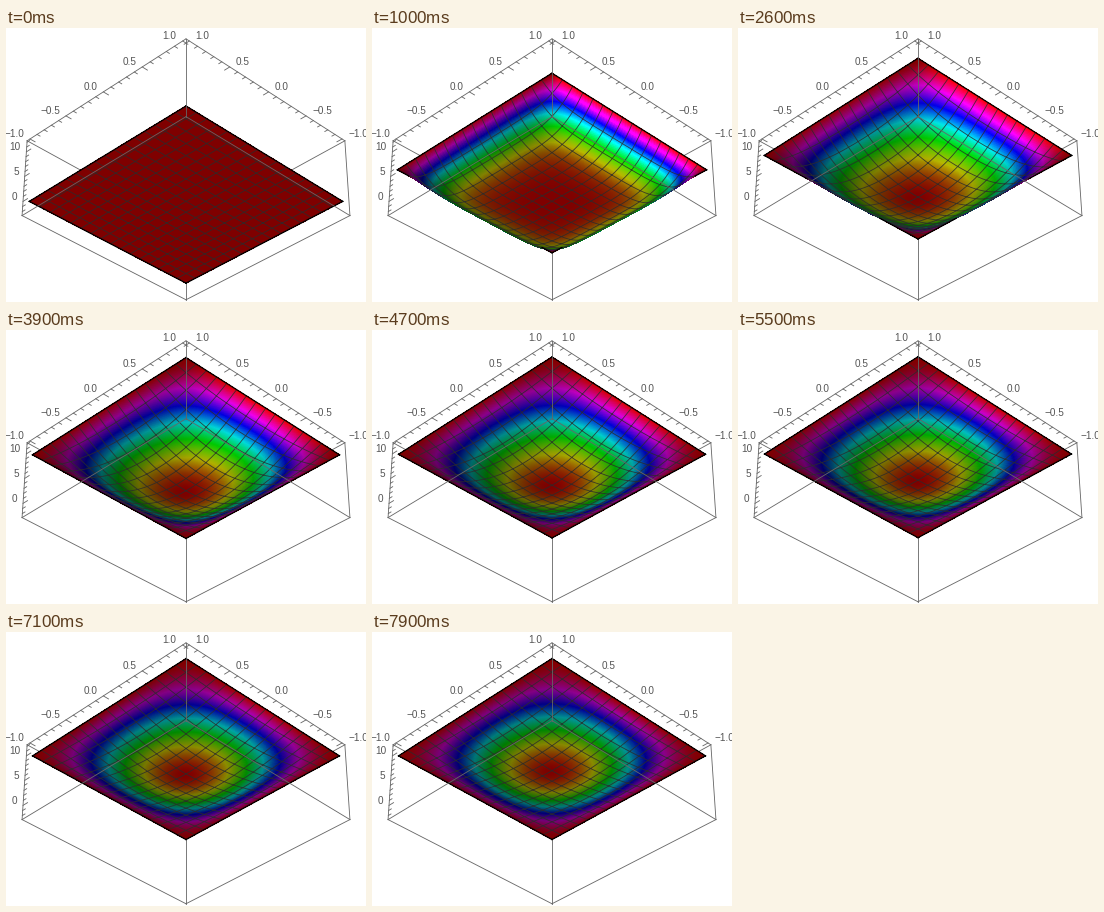
Recreate the animation shown at these times as a matplotlib script. Size 360 px wide and 274 px high, loop 8000 ms.

```python
import numpy as np
import matplotlib.pyplot as plt
from matplotlib.animation import FuncAnimation

W, H, DPI = 360, 274, 100
PX = 72 / DPI
FRAMES, STEP = 80, 100

# Camera below the box, looking up at its near vertical edge
DIST, SCALE = 14.6, 114.1
S, C = 0.5735, 0.8192
CX, CY = 180, 149.6
R2 = np.sqrt(2)

# Box of 2 x 2 x 0.8 around the padded plot range
PAD = 1.04
Z_LO, Z_HI = -2.79, 12.29
Z_UNIT = 0.8 / (Z_HI - Z_LO)

# Heat flow on [-1, 1]^2 whose rim warms as 10 (1 - exp(-t))
ALPHA = 0.05
CELLS, SUB = 16, 30
N = CELLS * SUB + 1
axis = np.linspace(-1, 1, N)
modes = np.arange(1, 80, 2)
freq = modes * np.pi / 2
coef = 4 / np.pi * (-1.0) ** ((modes - 1) // 2) / modes
basis = np.cos(np.outer(axis, freq)) * coef
slope = -np.sin(np.outer(axis, freq)) * coef * freq
rate = ALPHA * (freq[:, None] ** 2 + freq[None, :] ** 2)

bx, by = np.meshgrid(axis / PAD, axis / PAD, indexing="ij")
U, V = (bx + by) / R2, (bx - by) / R2

LIGHTS = [np.array(p) / np.linalg.norm(p) for p in ((1, 0, 1), (1, 1, 1), (0, 1, 1))]


def view(u, v, z):
    """Project depth-wise u, sideways v and height z to pixels."""
    f = SCALE / (1 - (u * C - z * S) / DIST)
    return CX + f * v, CY - f * (u * S + z * C)


def project(x, y, z):
    return view((x + y) / R2, (x - y) / R2, z)


def height(value):
    return -0.4 + (value - Z_LO) * Z_UNIT


def hue(h):
    wheel = (h[..., None] * 6 + np.array([0, 4, 2])) % 6
    return np.clip(np.abs(wheel - 3) - 1, 0, 1)


def solve(t):
    """Temperature and its two slopes at time t."""
    rim = 10 * (1 - np.exp(-t))
    g = 10 * (np.exp(-t) - np.exp(-rate * t)) / (rate - 1)
    return (rim - basis @ g @ basis.T,
            -slope @ g @ basis.T,
            -basis @ g @ slope.T)


def surface(t):
    """Pixel positions, lit colours and facing of the sheet."""
    temp, tx, ty = solve(t)
    z = height(temp)
    zx, zy = tx * Z_UNIT * PAD, ty * Z_UNIT * PAD
    nu, nv = (zx + zy) / R2, (zx - zy) / R2
    size = np.sqrt(1 + zx ** 2 + zy ** 2)
    normal = (nv / size, (nu * S - C) / size, (nu * C + S) / size)
    shade = 0.35 + 0.37 * sum(
        np.maximum(0, sum(a * b for a, b in zip(normal, light))) for light in LIGHTS)
    span = temp.max() - temp.min()
    h = (temp - temp.min()) / span if span > 1e-9 else np.zeros_like(temp)
    rgb = np.clip(hue(np.clip(h, 0, 1)) * shade[..., None], 0, 1)
    facing = nu * (DIST * C - U) - nv * V + DIST * S + z > 0
    px, py = view(U, V, z)
    return px, py, rgb, facing


def raster(px, py, rgb):
    """Paint samples from far to near into an RGBA picture."""
    img = np.zeros((H, W, 4))
    ix = np.clip(px.astype(int), 0, W - 1).ravel()
    iy = np.clip(py.astype(int), 0, H - 1).ravel()
    img[iy, ix, :3] = rgb.reshape(-1, 3)
    img[iy, ix, 3] = 1
    return img


def strands(a, rows):
    """Chosen grid lines in both directions, joined with gaps."""
    both = np.vstack([a[rows, ::3], a[::3, rows].T])
    return np.pad(both, ((0, 0), (0, 1)), constant_values=np.nan).ravel()


fig = plt.figure(figsize=(W / DPI, H / DPI), dpi=DPI, facecolor="white")
ax = fig.add_axes([0, 0, 1, 1])
ax.set_xlim(0, W)
ax.set_ylim(H, 0)
ax.axis("off")

GRAY = "#666666"


def line(p, q, z=4, lw=0.85):
    a, b = project(*p), project(*q)
    ax.plot([a[0], b[0]], [a[1], b[1]], color=GRAY, lw=lw * PX, zorder=z)


def label(p, text, side):
    x, y = project(*p)
    ax.text(x + 6 * side, y - 5.5, text, color="#555555", family="Liberation Sans",
            fontsize=10 * PX, ha="right" if side < 0 else "left",
            va="center_baseline", zorder=5)


def draw_box():
    for z in (-0.4, 0.4):
        for s in (-1, 1):
            order = 4 if s > 0 else 1
            line((s, -1, z), (s, 1, z), order)
            line((-1, s, z), (1, s, z), order)
    for x in (-1, 1):
        for y in (-1, 1):
            line((x, y, -0.4), (x, y, 0.4), 1 if x + y < 0 else 4)


def draw_ticks():
    for i in range(-10, 11):
        p = i / 10 / PAD
        major = i % 5 == 0
        inner = 1 - (0.06 if major else 0.035)
        line((p, 1, 0.4), (p, inner, 0.4))
        line((1, p, 0.4), (inner, p, 0.4))
        if major:
            text = f"{i / 10:.1f}".replace("-", "\u2212")
            label((p, 1, 0.4), text, -1)
            label((1, p, 0.4), text, 1)
    for v in range(-2, 13):
        z = height(v)
        major = v % 5 == 0
        line((-1, 1, z), (-1 + (0.06 if major else 0.035), 1, z))
        if major:
            label((-1, 1, z), str(v), -1)


draw_box()
draw_ticks()
sheet = ax.imshow(np.zeros((H, W, 4)), extent=(0, W, H, 0), aspect="auto",
                  interpolation="nearest", zorder=2)
mesh, = ax.plot([], [], color="#2b2b2b", alpha=0.85, lw=0.85 * PX, zorder=3)
rim, = ax.plot([], [], color="black", lw=1.3 * PX, zorder=3)
MESH_ROWS = np.arange(SUB, N - 1, SUB)
RIM_ROWS = np.array([0, N - 1])


def update(i):
    px, py, rgb, facing = surface(i / 10)
    sheet.set_data(raster(px, py, rgb))
    seen = np.where(facing, px, np.nan)
    mesh.set_data(strands(seen, MESH_ROWS), strands(py, MESH_ROWS))
    rim.set_data(strands(seen, RIM_ROWS), strands(py, RIM_ROWS))
    return sheet, mesh, rim


anim = FuncAnimation(fig, update, frames=FRAMES, interval=STEP,
                     repeat=True, repeat_delay=0, blit=False)
plt.show()
```
